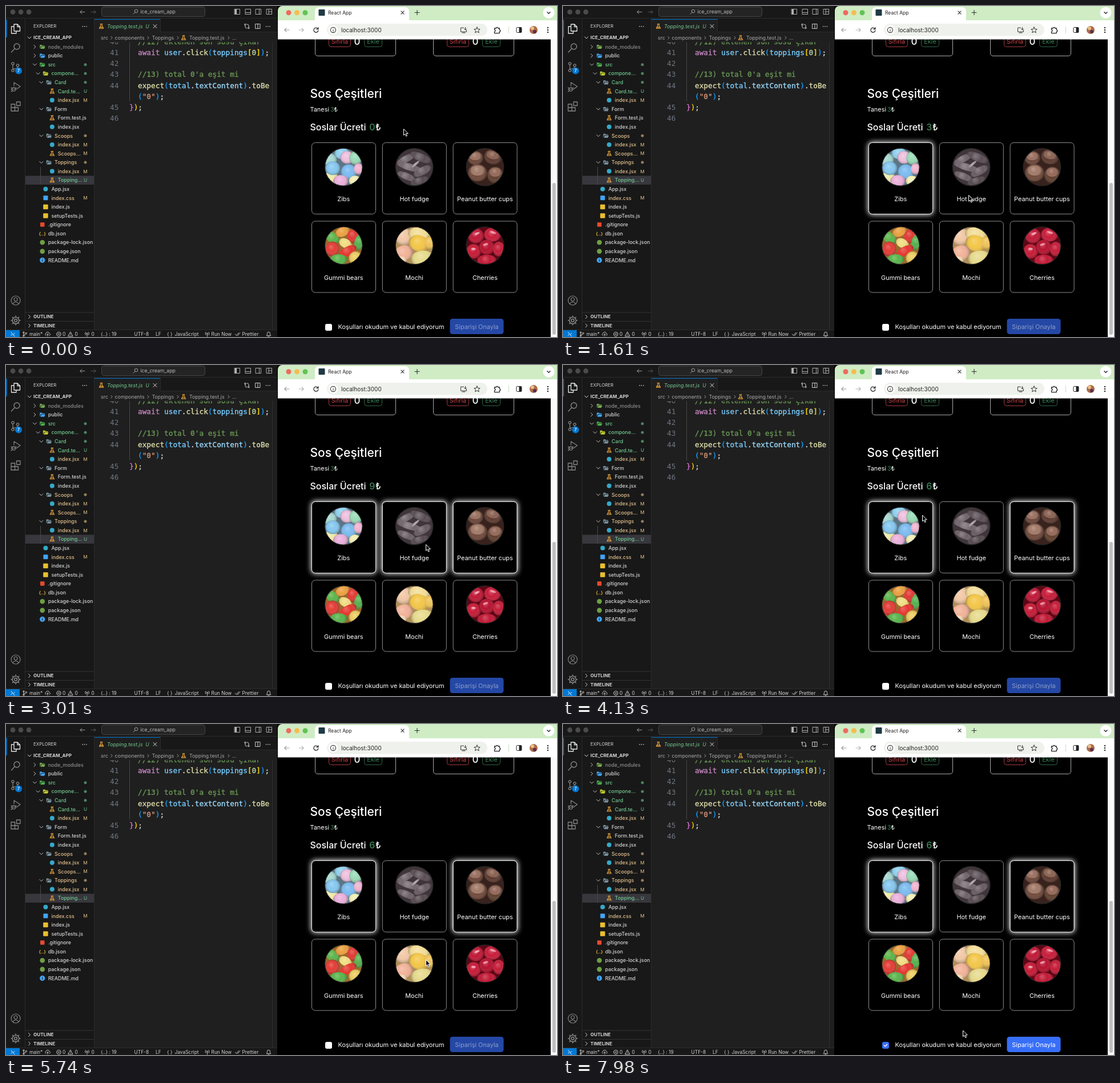
An HTML page with a canvas that plays this animation: 965x580 px, repeating every 8000 ms.

```html
<!DOCTYPE html>
<html lang="tr">
<head>
<meta charset="utf-8">
<title>Ice cream app</title>
<style>
html, body { margin: 0; width: 100%; height: 100%; overflow: hidden; background: #000; }
canvas { display: block; }
</style>
</head>
<body>
<canvas id="stage" width="965" height="580"></canvas>
<script>
const W = 965, H = 580, LOOP = 8000, STEP = 70;
const UI = 'Inter, sans-serif', MONO = '"DejaVu Sans Mono", monospace';
const stage = document.getElementById('stage').getContext('2d');
const base = document.createElement('canvas');
base.width = W;
base.height = H;
let c = base.getContext('2d');

// ---- drawing helpers ----
function text(s, x, y, size, color, style = '', align = 'left', family = UI) {
  c.font = `${style} ${size}px ${family}`;
  c.textAlign = align;
  c.fillStyle = color;
  c.fillText(s, x, y + size * 0.363);
}
function rect(x, y, w, h, fill, r = 0, stroke) {
  c.beginPath();
  c.roundRect(x, y, w, h, r);
  if (fill) { c.fillStyle = fill; c.fill(); }
  if (stroke) { c.strokeStyle = stroke; c.lineWidth = 1; c.stroke(); }
}
function icon(x, y, d, stroke, w = 1, fill) {
  c.save();
  c.translate(x, y);
  const p = new Path2D(d);
  c.lineJoin = c.lineCap = 'round';
  if (fill) { c.fillStyle = fill; c.fill(p); }
  if (stroke) { c.strokeStyle = stroke; c.lineWidth = w; c.stroke(p); }
  c.restore();
}
const ring = (x, y, r) => `M${x - r} ${y}a${r} ${r} 0 1 1 ${2 * r} 0a${r} ${r} 0 1 1 ${-2 * r} 0`;
const disc = (x, y, r, color) => icon(x, y, ring(0, 0, r), null, 0, color);
const square = (x, y, s, color) => rect(x - s / 2, y - s / 2, s, s, color, 1);

const RIGHT = 'M-1.5-3l3 3l-3 3', DOWN = 'M-3-1.5l3 3l3-3', CROSS = 'M-3-3l6 6M3-3l-6 6';
const FLASK = 'M-1.8-4h3.6M-1.1-4v3l-2.6 4.6h7.4l-2.6-4.6v-3M-2.4 1.6h4.8';
const ARROW_L = 'M4 0h-8M-1-3.2l-3.2 3.2l3.2 3.2', ARROW_R = 'M-4 0h8M1-3.2l3.2 3.2l-3.2 3.2';
const FOLDER = 'M-4.5-3.5h3.5l1 1.2h4v1.2h-6.5l-2 4.6z M-1.7-0.4h6.7l-1.5 4h-7z';
const ANTENNA = ring(0, -1, 1) + 'M0 0v4M-2.5 1.5a3.6 3.6 0 0 1 0-5M2.5 1.5a3.6 3.6 0 0 0 0-5';
const BRANCH = ring(-2, -3, 1.2) + ring(-2, 3, 1.2) + ring(2.4, -1.6, 1.2) + 'M-2-1.8v3.6M2.4-.4q0 1.6-4.4 1.8';

// ---- code editor window ----
const GREY = '#868686', TXT = '#d4d4d4', GREEN = '#73c991', SAND = '#e2c08d', DIM = '#8c8c8c';

function titleBar() {
  [12, 26, 40].forEach(x => disc(x, 10.5, 4.4, '#4b4b4b'));
  icon(134, 10.5, ARROW_L, '#999');
  icon(153, 10.5, ARROW_R, '#555');
  rect(167.5, 1.5, 181, 17, '#242424', 4, '#454545');
  icon(227, 10, ring(1, -1, 2.8) + 'M-1 1.2l-3 3', '#aaa', 0.9);
  text('ice_cream_app', 235.5, 10.3, 8.7, '#bbb');
  ['M-1.5-4.5v9', 'M-4.5 1.5h9', 'M1.5-4.5v9', 'M-1-4.5v9M-1 0h5.5'].forEach((d, i) =>
    icon([405, 424, 442, 461][i], 10, 'M-4.5-4.5h9v9h-9z' + d, '#bbb', 0.9));
  rect(401, 6, 3, 8, '#bbb');
}

function activityBar() {
  rect(0, 24, 1.5, 31, '#0078d4');
  icon(17, 40, 'M-3-8h6l4.5 4.5v7.5h-10.5zM3-8v4.5h4.5M-3-4h-4.5v12h8.5v-4', '#e8e8e8', 1.3);
  icon(17, 73, ring(2, -2, 5) + 'M-1.6 1.6l-6 6.4', GREY, 1.4);
  icon(16, 107, ring(-4, -6, 2.2) + ring(-4, 6, 2.2) + ring(4.5, -3, 2.2) + 'M-4-3.8v7.6M4.5-.8q0 4-8.5 4', GREY, 1.3);
  disc(22, 113.5, 6, '#0078d4');
  text('7', 22, 113.5, 7, '#fff', '600', 'center');
  icon(17, 142, 'M-3-2v-6l11 7l-7 5' + ring(-3.5, 4, 3.2) + 'M-8 1l2 1.5M-8 4h1.5M-8 8l2-1.8M1 1l-2 1.5M-6.5 4h6', GREY, 1.2);
  icon(17, 176, 'M-8-4h6.5v6h6v6h-12.5zM-8 2h6.5v6M1.5-8h6.5v6.5h-6.5z', GREY, 1.3);
  icon(17, 516, ring(0, 0, 8) + ring(0, -2, 3) + 'M-5.3 6q5.3-7 10.6 0', GREY, 1.2);
  let gear = ring(0, 0, 2.4) + ring(0, 0, 5.8);
  for (let i = 0; i < 8; i++) {
    const a = i * Math.PI / 4, x = Math.cos(a), y = Math.sin(a);
    gear += `M${6 * x} ${6 * y}L${8 * x} ${8 * y}`;
  }
  icon(17, 551, gear, GREY, 1.5);
}

const marks = {
  flask: (x, y) => icon(x, y, FLASK, '#f0a83a', 1.1),
  react: (x, y) => disc(x, y, 4, '#35a9c9'),
  css: (x, y) => square(x, y, 8, '#42a5f5'),
  js: (x, y) => square(x, y, 8.5, '#e9bf30'),
  git: (x, y) => square(x, y, 7.5, '#e64a2e'),
  node: (x, y) => disc(x, y, 4.3, '#6fa044'),
  json: (x, y) => text('{..}', x, y, 8, '#f0b83a', '600', 'center'),
  info: (x, y) => { disc(x, y, 4.6, '#42a5f5'); text('i', x, y, 7, '#181818', '700', 'center'); }
};

// depth, kind (a colour means folder), label, colour, badge, closed
const tree = [
  [1, '#75a653', 'node_modules', DIM, '', 1], [1, '#42a5f5', 'public', TXT, '', 1],
  [1, '#4caf50', 'src', GREEN, '•'], [2, '#c0ca33', 'compone...', GREEN, '•'],
  [3, '#78909c', 'Card', GREEN, '•'], [4, 'flask', 'Card.te...', GREEN, 'U'], [4, 'react', 'index.jsx', SAND, 'M'],
  [3, '#78909c', 'Form', TXT], [4, 'flask', 'Form.test.js', TXT], [4, 'react', 'index.jsx', TXT],
  [3, '#78909c', 'Scoops', SAND, '•'], [4, 'react', 'index.jsx', SAND, 'M'], [4, 'flask', 'Scoops...', SAND, 'M'],
  [3, '#78909c', 'Toppings', SAND, '•'], [4, 'react', 'index.jsx', SAND, 'M'], [4, 'flask', 'Topping...', GREEN, 'U'],
  [2, 'react', 'App.jsx', TXT], [2, 'css', 'index.css', SAND, 'M'], [2, 'js', 'index.js', TXT],
  [2, 'js', 'setupTests.js', TXT], [1, 'git', '.gitignore', TXT], [1, 'json', 'db.json', TXT],
  [1, 'node', 'package-lock.json', TXT], [1, 'node', 'package.json', TXT], [1, 'info', 'README.md', TXT]
];

function sidebar() {
  text('EXPLORER', 48, 35.5, 7.9, TXT);
  text('···', 137.5, 35.5, 10, TXT, '700', 'center');
  icon(41, 55.5, DOWN, TXT);
  text('ICE_CREAM_APP', 48, 55.5, 8.1, TXT, '700');
  rect(34, 297.5, 120, 15.5, '#37373d');
  rect(60, 282, 1, 31, '#4a4a4a');
  tree.forEach(([depth, kind, label, color, badge, closed], i) => {
    const y = 71.5 + i * 15.58, x = 68 + depth * 5.7;
    if (kind[0] === '#') {
      icon(x - 23.3, y, closed ? RIGHT : DOWN, TXT, 0.9);
      icon(x - 10, y, FOLDER, null, 0, kind);
    } else marks[kind](x - 10, y);
    text(label, x, y, 8.9, color, '500');
    if (badge === '•') { c.globalAlpha = 0.6; disc(139, y, 2.5, color); c.globalAlpha = 1; }
    else if (badge) text(badge, 139, y, 8.2, color, '', 'center');
  });
  [['OUTLINE', 544.5], ['TIMELINE', 560]].forEach(([s, y]) => {
    rect(34, y - 8, 120, 1, '#333');
    icon(41, y, RIGHT, TXT);
    text(s, 48, y, 8.1, TXT, '700');
  });
}

// Code glyphs get a hairline outline for a slightly heavier weight
function code(x, y, ...parts) {
  for (const [s, color] of parts) {
    text(s, x, y, 12.76, color, '', 'left', MONO);
    c.strokeStyle = color;
    c.lineWidth = 0.35;
    c.strokeText(s, x, y + 12.76 * 0.363);
    x += c.measureText(s).width;
  }
}

function editor() {
  rect(155, 46, 320, 521, '#1f1f1f');
  const note = '#6a9955', fn = '#dcdcaa', name = '#78cdff', prop = '#9cdcfe', white = '#d4d4d4',
    blue = '#179fff', gold = '#ffd700', pink = '#da70d6';
  c.save();
  c.beginPath();
  c.rect(155, 63.5, 320, 503);
  c.clip();
  rect(216, 63, 1, 104, '#474747');
  text('40', 182, 62, 12.76, '#6e7681', '', 'left', MONO);
  code(231, 62, ['//12) eklenen son sosu çıkar', note]);
  code(231, 81.5, ['await ', '#c586c0'], ['user', name], ['.', white], ['click', fn], ['(', blue],
    ['toppings', name], ['[', gold], ['0', '#b5cea8'], [']', gold], [')', blue], [';', white]);
  code(231, 119.8, ["//13) total 0'a eşit mi", note]);
  code(231, 139, ['expect', fn], ['(', blue], ['total', name], ['.', white], ['textContent', prop],
    [')', blue], ['.', white], ['toBe', fn]);
  code(231, 158, ['(', blue], ['"0"', '#ce9178'], [')', blue], [';', white]);
  code(216, 177.3, ['}', pink], [')', gold], [';', white]);
  [81.5, 100.6, 119.8, 139, 177.3, 196.5].forEach((y, i) =>
    text(41 + i, 182, y, 12.76, '#6e7681', '', 'left', MONO));
  c.restore();
  rect(466, 63, 1, 504, '#303030');

  rect(155, 22, 115, 24, '#1f1f1f');
  rect(155, 23, 115, 1, '#0078d4');
  rect(270, 22, 1, 24, '#2b2b2b');
  rect(271, 45, 204, 1, '#2b2b2b');
  marks.flask(167, 35.5);
  text('Topping.test.js', 177, 35.5, 9, GREEN, 'italic');
  text('U', 247.5, 35.5, 8.4, GREEN, 'italic', 'center');
  icon(261, 35.5, CROSS, '#ddd');
  icon(422, 35.5, ring(-3, -3, 1.3) + ring(3, 3, 1.3) + 'M-3-1.5v3q0 2 3 2M3 1.5v-3q0-2-3-2', '#ccc');
  icon(441, 35.5, 'M-4-4h8v8h-8zM0-4v8', '#ccc');
  text('···', 459, 35.5, 10, '#ccc', '700', 'center');

  const crumb = '#a9a9a9';
  [['src', 166], ['components', 190.5], ['Toppings', 255.5], ['Topping.test.js', 321], ['...', 396]]
    .forEach(([s, x]) => text(s, x, 55.7, 8.9, crumb));
  [185, 249, 301, 390].forEach(x => icon(x, 55.7, 'M-1.2-2.4l2.4 2.4l-2.4 2.4', crumb, 0.9));
  marks.flask(311, 55.7);
}

function statusBar() {
  const y = 575;
  rect(0, 567, 475, 1, '#2b2b2b');
  rect(0, 568, 24, 12, '#0078d4');
  icon(12, y, 'M-3-3l2.6 2.6l-2.6 2.6M3-1.5l-2.6 2.6l2.6 2.6', '#fff');
  icon(33, y, BRANCH, TXT, 0.9);
  icon(73, y, 'M-3 2.5a2.2 2.2 0 0 1 0-4a3 3 0 0 1 5.8 0a2.2 2.2 0 0 1 .4 4M0 3.5v-4M-1.6 1l1.6-1.5l1.6 1.5', TXT, 0.9);
  icon(92.5, y, ring(0, 0, 3.7) + 'M-1.5-1.5l3 3M1.5-1.5l-3 3', TXT, 0.9);
  icon(113, y, 'M0-3.8l4 7.4h-8zM0-1v2', TXT, 0.9);
  icon(142, y, ANTENNA, TXT, 0.9);
  icon(352.5, y, ANTENNA, TXT, 0.9);
  icon(406, y, 'M-4.5 0l2 2.5l4-5M-.5 2.2l.4.3l4-5', TXT, 0.9);
  icon(460, y, 'M-3.6 2.4l1-1.6v-2a2.6 2.6 0 0 1 5.2 0v2l1 1.6zM-1 3.8h2', TXT, 0.9);
  [['main*', 41], ['0', 99], ['0', 120.5], ['0', 149.5], ['{..} : 19', 166], ['UTF-8', 224.5], ['LF', 262],
    ['{ }', 282], ['JavaScript', 295.5], ['Run Now', 359.5], ['Prettier', 413.5]]
    .forEach(([s, x]) => text(s, x, y, 8.4, TXT));
}

// ---- browser window ----
function browser() {
  rect(476, 0, 489, 58, '#cfecc4', [8, 0, 0, 0]);
  [['#ee6a5f', 495], ['#f5bd4f', 509.5], ['#61c454', 524]].forEach(([color, x]) => disc(x, 11.8, 4.5, color));
  rect(476, 25, 489, 33.5, '#fff');
  rect(541, 2, 165, 24, '#fff', [7, 7, 0, 0]);
  square(553, 11.5, 11, '#1f3a44');
  text('React App', 564, 11.5, 8.5, '#222');
  icon(694.5, 11.5, 'M-2.6-2.6l5.2 5.2M2.6-2.6l-5.2 5.2', '#333', 1.1);
  icon(720, 11.5, 'M-4 0h8M0-4v8', '#333', 1.1);
  disc(950.5, 11.8, 10, '#fff');
  icon(950.5, 12, 'M-2.6-1.2l2.6 2.6l2.6-2.6', '#222', 1.3);

  icon(492, 42, ARROW_L, '#9b9b9b', 1.2);
  icon(517, 42, ARROW_R, '#b4b4b4', 1.2);
  icon(543, 42, 'M3.6-1.5a4 4 0 1 0 .3 2.5M4-4.4v3h-3', '#333', 1.3);
  rect(562, 31, 281, 21.5, '#eff2ec', 10.7);
  disc(573, 42, 8.3, '#fff');
  icon(573, 42, ring(0, 0, 4.6) + 'M0 0v2.2M0-2v.1', '#333', 1.1);
  text('localhost:3000', 587, 42, 10, '#222');
  icon(801.5, 42, 'M0-3.8h-5v7h10v-3M-2.5 5h5M3-4.5v4M1-2l2 1.8l2-1.8', '#333');
  icon(825, 42, 'M0-5l1.5 3.4l3.7.3l-2.8 2.4l.9 3.7l-3.3-2l-3.3 2l.9-3.7l-2.8-2.4l3.7-.3z', '#333');
  icon(860, 42, 'M-4.5-3h3a1.6 1.6 0 0 1 3.2 0h2.6v2.8a1.6 1.6 0 0 1 0 3.2v2.6h-8.8v-2.8a1.6 1.6 0 0 0 0-3.2z', '#222', 1.3);
  rect(880, 36, 1, 12, '#c9dcbf');
  rect(894, 37.5, 9, 9, null, 1.5, '#222');
  rect(898.5, 37.5, 4.5, 9, '#222');
  disc(924, 42, 7, '#b06a48');
  disc(922, 39, 3, '#eac28d');
  disc(926, 45, 3, '#55304f');
  [-4, 0, 4].forEach(d => disc(949, 42 + d, 1.2, '#222'));

  rect(954, 58, 11, 522, '#fafafa');
  rect(957, 310, 6, 266, '#bfbfbf', 3);
}

const LINE = '#8c8c8c', PRICE = '#3c8659', BODY = 10.9;
const products = ['Zibs', 'Hot fudge', 'Peanut butter cups', 'Gummi bears', 'Mochi', 'Cherries'];
const cell = i => [535.5 + (i % 3) * 123.8, 239.5 + (i / 3 | 0) * 137.5];

// Each photo: ground colour, then blobs of x, y, rx, ry, tilt, colour
const photos = [
  ['#5c7585', [-24, -13, 12, 11, 0, '#a5d8d0'], [-3, -24, 13, 10, 0, '#8fd0ee'], [6, -17, 12, 11, 0, '#efc0de'],
    [21, -16, 11, 12, 0, '#9bdcb8'], [-22, 19, 12, 12, 0, '#eee8a4'], [-19, 2, 13, 12, 0, '#86c8f0'],
    [9, 8, 14, 13, 0, '#7cbcf0'], [26, 3, 8, 10, 0, '#f0b4d0'], [-5, 24, 13, 10, 0, '#eab0da'], [20, 24, 11, 9, 0, '#f2eeb4']],
  ['#40363a', [-15, -14, 18, 6, -0.5, '#6f646b'], [11, -17, 20, 7, 0.4, '#594e54'], [-8, 0, 24, 6, 0.3, '#72666d'],
    [14, 7, 17, 7, -0.5, '#685c62'], [-14, 16, 17, 6, 0.4, '#6c6067'], [9, 24, 17, 6, -0.3, '#54494e'], [2, -5, 9, 2, -0.7, '#a89aa2']],
  ['#38221d', [-17, -16, 14, 12, 0, '#6b4638'], [-17, -19, 11, 7, 0, '#9a7060'], [14, -18, 16, 13, 0.2, '#5c3a2f'],
    [14, -21, 12, 7, 0.2, '#8a6252'], [-13, 10, 17, 15, 0, '#70493a'], [-13, 6, 13, 9, 0, '#a27a68'],
    [18, 14, 14, 15, 0, '#60402f'], [18, 9, 11, 8, 0, '#95695a']],
  ['#9c6a2c', [-20, -14, 14, 9, 0.7, '#5cb44a'], [-2, -24, 13, 8, -0.4, '#eaa040'], [16, -17, 10, 13, 0.3, '#e03a34'],
    [27, -6, 8, 14, 0.2, '#55b04e'], [-20, 6, 12, 13, 0.2, '#e33c35'], [3, -4, 12, 8, 0.5, '#f0dc80'],
    [7, 10, 17, 8, -0.5, '#e5352f'], [-9, 24, 15, 9, 0, '#58b44c'], [21, 22, 12, 12, 0.3, '#eccc60']],
  ['#b08f58', [-19, -16, 16, 15, 0.2, '#f2c8a6'], [9, -20, 20, 12, 0.1, '#f2dc96'], [8, -4, 18, 14, 0.3, '#f3c648'],
    [-19, 13, 17, 13, -0.4, '#f2b298'], [14, 22, 20, 13, -0.1, '#e6da8c'], [27, -5, 9, 12, 0, '#eec258'], [-24, 25, 11, 6, 0, '#f4d8b4']],
  ['#5c0716', [-16, -17, 14, 13, 0, '#c01836'], [13, -19, 15, 12, 0, '#c81c3a'], [-20, 10, 13, 13, 0, '#c81a36'],
    [3, 3, 14, 13, 0, '#b7122f'], [24, 6, 10, 13, 0, '#c41c38'], [3, 26, 17, 10, 0, '#c01834'],
    [-14, -21, 5, 2, -0.4, '#f19aa9'], [14, -23, 6, 2, 0.3, '#ef8c9d'], [1, -2, 5, 2, -0.3, '#ee8298'], [-20, 6, 4, 2, 0, '#f09bac']]
];

function photo(cx, cy, [ground, ...blobs]) {
  disc(cx, cy, 33.5, '#242424');
  c.save();
  c.translate(cx, cy);
  c.beginPath();
  c.arc(0, 0, 32.3, 0, 7);
  c.clip();
  c.fillStyle = ground;
  c.fill();
  for (const [x, y, rx, ry, tilt, color] of blobs) {
    const shade = c.createRadialGradient(x - rx * 0.2, y - ry * 0.35, 0, x, y, Math.max(rx, ry));
    shade.addColorStop(0, '#ffffff40');
    shade.addColorStop(0.5, '#ffffff00');
    shade.addColorStop(1, '#00000048');
    c.beginPath();
    c.ellipse(x, y, rx, ry, tilt, 0, 7);
    for (const fill of [color, shade]) {
      c.fillStyle = fill;
      c.fill();
    }
  }
  c.restore();
}

function page() {
  c.save();
  c.beginPath();
  c.rect(476, 58, 479, 522);
  c.clip();
  [0, 207].forEach(dx => {
    rect(541.5 + dx, 40, 141, 47.5, null, 4.5, '#a8a8a8');
    rect(565.5 + dx, 50, 38, 21.5, null, 4, '#a63a41');
    text('Sıfırla', 584.5 + dx, 62, BODY, '#cb444a', '', 'center');
    text('0', 615 + dx, 61.5, 17, '#fff', '500', 'center');
    rect(627.5 + dx, 50, 31, 21.5, null, 4, '#2f6847');
    text('Ekle', 643 + dx, 62, BODY, PRICE, '', 'center');
  });
  c.restore();
  text('Sos Çeşitleri', 532.5, 153, 21, '#fff', '500');
  text('Tanesi', 532.5, 181, BODY, '#fff');
  text('3', 568, 181, BODY, PRICE);
  text('₺', 574.5, 181, BODY, '#fff');
  text('Soslar Ücreti', 532.5, 211.8, 16, '#fff', '500');
  text('₺', 647, 211.8, 16, '#fff', '500');
  products.forEach((label, i) => {
    const [x, y] = cell(i);
    rect(x, y, 112, 125, '#000', 6, LINE);
    photo(x + 55.8, y + 42.8, photos[i]);
    text(label, x + 55.8, y + 98.7, BODY, '#fff', '', 'center');
  });
  text('Koşulları okudum ve kabul ediyorum', 581.5, 562, BODY, '#fff');
}

function drawBase() {
  rect(0, 0, W, H, '#000');
  rect(0, 0, 475, H, '#181818');
  rect(33, 22, 1, 545, '#2b2b2b');
  rect(154, 22, 1, 545, '#2b2b2b');
  rect(0, 21, 475, 1, '#2b2b2b');
  titleBar();
  activityBar();
  sidebar();
  editor();
  statusBar();
  page();
  browser();
}

// ---- motion ----
const path = [
  [0, 696.5, 216], [350, 630, 469], [420, 630, 469], [1050, 612, 318], [1260, 612, 318], [1610, 710.5, 332],
  [1820, 717, 330], [1960, 724, 318], [2170, 724, 318], [2520, 842, 318], [2730, 842, 318], [3010, 735.5, 315],
  [3290, 728, 316], [3500, 719, 319], [3640, 719, 319], [4130, 629.5, 263.5], [4410, 633, 262], [4760, 645, 223],
  [5250, 645, 207], [5390, 641, 213], [5460, 641, 213], [5740, 735.5, 413.5], [6300, 566, 561], [6580, 566, 561],
  [7070, 746.5, 570], [7280, 804, 559], [7350, 805, 560], [7420, 805, 560], [7980, 700.5, 537.5]
];
const toggles = [[1190, 0], [2170, 1], [2730, 2], [3640, 1]];
const AGREE = 6580;

// Smooth curve through the points; speed is zero next to a rest
function slope(i, k) {
  const a = path[i - 1], p = path[i], b = path[i + 1];
  if (!a || !b || a[1] === p[1] || b[1] === p[1]) return 0;
  return (p[k] - a[k]) * (b[k] - p[k]) <= 0 ? 0 : (b[k] - a[k]) / (b[0] - a[0]);
}
function pointer(t) {
  if (t >= path.at(-1)[0]) return path.at(-1).slice(1);
  const i = path.findIndex(p => p[0] > t) - 1;
  const a = path[i], b = path[i + 1], d = b[0] - a[0], u = (t - a[0]) / d, v = 1 - u;
  return [1, 2].map(k => a[k] * v * v * (1 + 2 * u) + b[k] * u * u * (3 - 2 * u)
    + d * u * v * (slope(i, k) * v - slope(i + 1, k) * u));
}

// Only the shadow shows: its caster lies off the canvas
function glow(i) {
  const [x, y] = cell(i);
  c.save();
  const outside = new Path2D();
  outside.rect(476, 58, 479, 522);
  outside.roundRect(x, y, 112, 125, 6);
  c.clip(outside, 'evenodd');
  c.shadowColor = '#fff';
  c.shadowBlur = 10;
  c.shadowOffsetX = 2 * W;
  rect(x - 1 - 2 * W, y - 1, 114, 127, '#fff', 7);
  c.restore();
  rect(x, y, 112, 125, null, 6, '#e8e8e8');
}

function draw(t) {
  c.drawImage(base, 0, 0);
  const chosen = new Set();
  for (const [at, i] of toggles) {
    if (t >= at && !chosen.delete(i)) chosen.add(i);
  }
  chosen.forEach(glow);
  text(chosen.size * 3, 636.3, 211.8, 16, PRICE, '500');

  const [x, y] = pointer(t), agreed = t >= AGREE;
  const hover = agreed && x > 778 && x < 871 && y > 548;
  rect(559, 557, 12, 12, agreed ? '#386ff8' : '#fff', 3);
  if (agreed) icon(565, 563, 'M-2.6 0l1.9 2l3.4-3.8', '#fff', 1.4);
  rect(777.5, 548, 94, 27, !agreed ? '#2548a6' : hover ? '#305fd6' : '#386ff8', 4.5);
  text('Siparişi Onayla', 824.5, 562, BODY, agreed ? '#fff' : '#8d9dc8', '', 'center');

  if (hover) icon(x, y, 'M-1.2-1.5a1.2 1.2 0 0 1 2.4 0v4.5l4.2 1q1.5.5 1.2 2.5l-.8 4.5q-.3 1.5-2 1.5h-3.2q-1 0-1.7-1.2l-3-5q0-1.6 1.6-1l1.3 1.5z', '#000', 0.8, '#fff');
  else icon(x, y, 'M0 0v10.4l2.4-2.2l1.8 4l1.8-.8l-1.8-3.9h3.2z', '#fff', 1, '#000');
}

drawBase();
c = stage;
const start = performance.now();
function frame(now) {
  const t = Math.max(0, now - start) % LOOP;
  draw(Math.floor(t / STEP) * STEP);
  requestAnimationFrame(frame);
}
requestAnimationFrame(frame);
</script>
</body>
</html>
```
